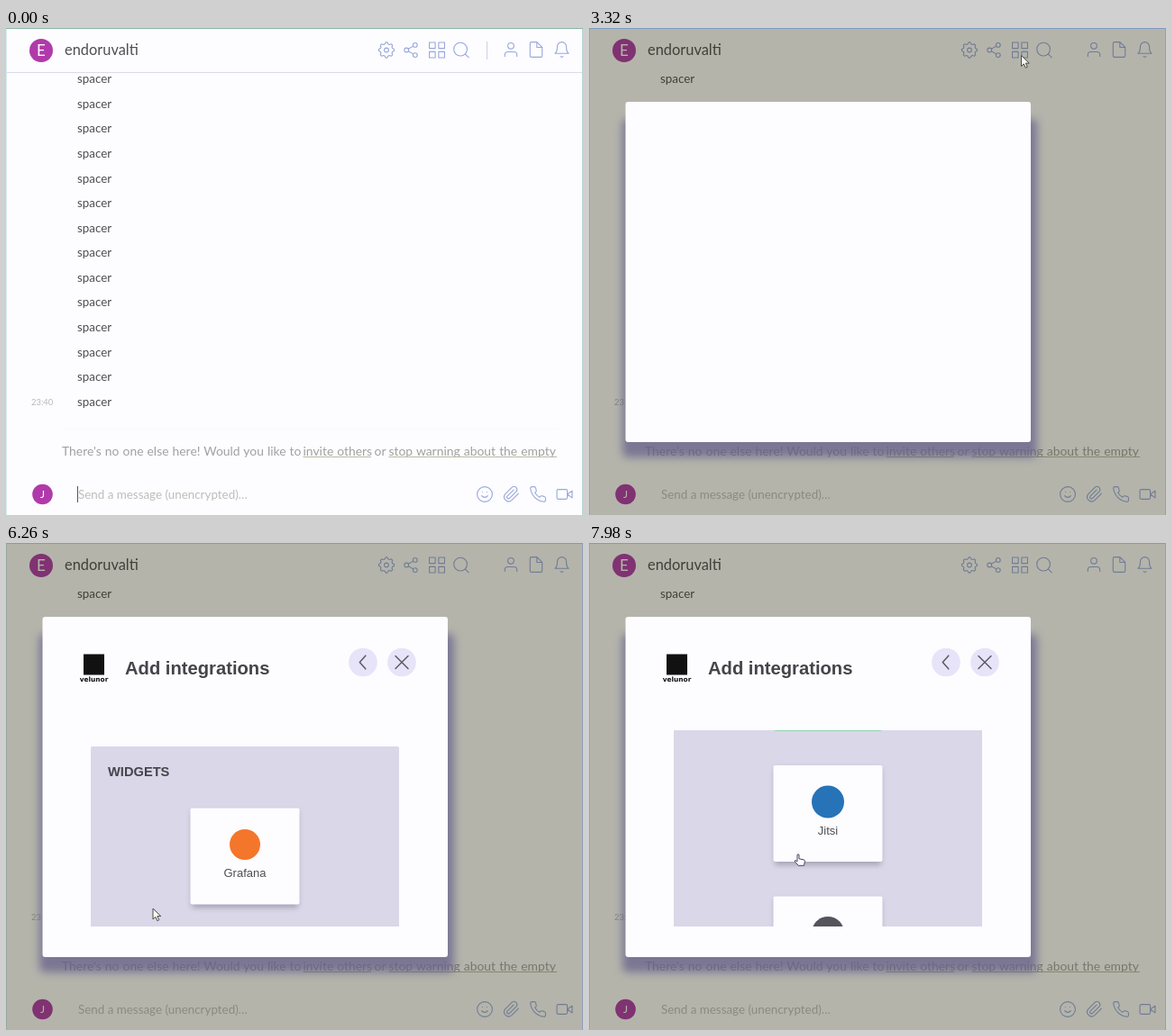
An HTML page for the animation above (8000 ms loop, 640 by 541 pixels).

```html
<!DOCTYPE html>
<html lang="en">
<head>
<meta charset="utf-8">
<title>Chat integrations</title>
<style>
  html, body { margin: 0; width: 100%; height: 100%; overflow: hidden; background: #fdfcff; }
  svg { display: block; width: 640px; height: 541px; }
  text { font-family: Lato, "Open Sans", sans-serif; font-size: 13.4px; fill: #4f4e53; white-space: pre; }
  .time { font-size: 9.4px; fill: #b8b7b9; }
  .notice { font-size: 13.9px; word-spacing: .5px; fill: #a1a0a1; }
  .dialog text { font-family: "Liberation Sans", Arial, sans-serif; font-size: 13px; }
  .dialog .title { font-size: 20.2px; font-weight: bold; fill: #45444a; }
  .dialog .section { font-size: 14.67px; font-weight: bold; fill: #45444a; }
  .dialog .brand { font: bold 7.4px "DejaVu Sans", sans-serif; fill: #111; }
</style>
</head>
<body>
<svg id="stage" viewBox="0 0 640 541" xmlns="http://www.w3.org/2000/svg"></svg>
<script>
const LOOP = 8000;
const ROW = 27.58;
const ICON = '#98a8da';
const INK = '#5c5c63';
const stage = document.getElementById('stage');

// ---- markup helpers ----
const rect = (x, y, w, h, fill, more = '') =>
  `<rect x="${x}" y="${y}" width="${w}" height="${h}" fill="${fill}" ${more}/>`;
const disc = (x, y, r, fill) => `<circle cx="${x}" cy="${y}" r="${r}" fill="${fill}"/>`;
const text = (x, y, value, more = '') => `<text x="${x}" y="${y}" ${more}>${value}</text>`;
const ring = (x, y, r) => `M${x - r} ${y}a${r} ${r} 0 1 0 ${2 * r} 0a${r} ${r} 0 1 0 ${-2 * r} 0`;
const icon = (x, y, scale, path, color = ICON, weight = 1.1) =>
  `<path transform="translate(${x} ${y}) scale(${scale}) translate(-12 -12)" d="${path}" fill="none"
    stroke="${color}" stroke-width="${weight / scale}" stroke-linecap="round" stroke-linejoin="round"/>`;
const avatar = (x, y, r, letter, size) => disc(x, y, r, '#b03aa9') +
  text(x, y + size * .36, letter, `text-anchor="middle" style="font-size:${size}px;fill:#fff"`);

function gearPath() {
  let d = '';
  for (let i = 0; i < 32; i++) {
    const angle = (i - 1.5) * Math.PI / 16;
    const radius = i % 4 === 1 || i % 4 === 2 ? 10.8 : 8.6;
    d += `${i ? 'L' : 'M'}${(12 + radius * Math.cos(angle)).toFixed(2)} ${(12 + radius * Math.sin(angle)).toFixed(2)}`;
  }
  return d + 'z' + ring(12, 12, 3);
}

const face = ring(12, 12, 10) + 'M8 14s1.5 2 4 2 4-2 4-2M9 9h.01M15 9h.01';
const paths = {
  gear: gearPath(),
  share: ring(18, 5, 3) + ring(6, 12, 3) + ring(18, 19, 3) + 'M8.6 13.5l6.8 4M15.4 6.5l-6.8 4',
  grid: 'M3 3h7v7H3zM14 3h7v7h-7zM14 14h7v7h-7zM3 14h7v7H3z',
  search: ring(11, 11, 8) + 'M21 21l-4.3-4.3',
  user: 'M20 21v-2a4 4 0 0 0-4-4H8a4 4 0 0 0-4 4v2' + ring(12, 7, 4),
  file: 'M13 2H6a2 2 0 0 0-2 2v16a2 2 0 0 0 2 2h12a2 2 0 0 0 2-2V9zM13 2v7h7',
  bell: 'M18 8A6 6 0 0 0 6 8c0 7-3 9-3 9h18s-3-2-3-9M13.7 21a2 2 0 0 1-3.4 0',
  clip: 'M21.4 11l-9.2 9.2a6 6 0 0 1-8.4-8.4L13 2.6a4 4 0 0 1 5.6 5.6l-9.2 9.2a2 2 0 0 1-2.8-2.8l8.5-8.5',
  phone: 'M22 16.9v3a2 2 0 0 1-2.2 2 19.8 19.8 0 0 1-8.6-3 19.5 19.5 0 0 1-6-6 19.8 19.8 0 0 1-3.1-8.7A2 2 0 0 1 4.1 2h3a2 2 0 0 1 2 1.7 12.8 12.8 0 0 0 .7 2.8 2 2 0 0 1-.4 2.1L8.1 9.9a16 16 0 0 0 6 6l1.3-1.3a2 2 0 0 1 2.1-.4 12.8 12.8 0 0 0 2.8.7A2 2 0 0 1 22 16.9z',
  video: 'M23 7l-7 5 7 5zM3 5h11a2 2 0 0 1 2 2v10a2 2 0 0 1-2 2H3a2 2 0 0 1-2-2V7a2 2 0 0 1 2-2z',
  react: face + 'M19 17.5h6M22 14.5v6',
  reply: 'M9 14L4 9.5 9 5M4 9.5h12a5 5 0 0 1 5 5V17',
  edit: 'M13 20h9M16.5 3.5a2.1 2.1 0 0 1 3 3L7 19l-4 1 1-4z',
  cross: 'M5 5l14 14M19 5L5 19',
  back: 'M15 4l-7 8 7 8'
};

// ---- chat window ----
function chat() {
  let rows = '';
  for (let i = 0; i < 14; i++) rows += text(79, 61.2 + i * ROW, 'spacer');
  const tools =
    icon(423, 148, .74, paths.react, INK) + icon(449, 148, .64, paths.reply, INK) +
    icon(475, 148, .66, paths.edit, '#85848c') +
    [142.5, 148, 153.5].map(y => disc(501, y, 1.5, '#3a3a4c')).join('');
  const notice = (x, value) => text(x, 475, value, 'class="notice"');
  const underline = (x1, x2) => rect(x1, 476, x2 - x1, 1, '#b9bba2');
  return rect(0, 0, 640, 541, '#fdfcff') +
    `<g clip-path="url(#messages)">
      <g id="hover">${rect(20, 154, 505, 27, '#f0fdff')}${text(28, 170, '23:40', 'class="time"')}${tools}</g>
      ${rows}</g>` +
    text(28, 418.5, '23:40', 'class="time"') +
    avatar(39, 25, 13, 'E', 17) +
    text(65, 30, 'endoruvalti', 'style="font-size:16.4px"') +
    icon(422, 24.5, .8, paths.gear) + icon(449, 24.5, .8, paths.share) +
    icon(478, 24.5, .94, paths.grid) + icon(505, 24.5, .92, paths.search) +
    icon(560, 24, .84, paths.user) + icon(588, 24, .84, paths.file) + icon(616.5, 24, .84, paths.bell) +
    `<g id="rules">${rect(0, 49, 640, 1, '#dcdbea')}${rect(533, 15, 1, 20, '#ccd2e6')}
      ${rect(62, 445, 549, 1, '#fcfbf5')}</g>` +
    notice(62, "There's no one else here! Would you like to") +
    notice(329.5, 'invite others') + underline(329.5, 405) +
    notice(408.5, 'or') +
    notice(424.5, 'stop warning about the empty') + underline(424.5, 611) +
    avatar(40.5, 518, 11.3, 'J', 12) +
    text(80, 523, 'Send a message (unencrypted)…', 'style="fill:#bebdb9"') +
    rect(79, 509, 1, 18, '#55555c', 'id="caret"') +
    icon(531, 518, .84, face) + icon(560.5, 518, .84, paths.clip) +
    icon(590, 518, .84, paths.phone) + icon(619.5, 518, .77, paths.video) +
    rect(634.5, 400, 5.5, 46, '#b7bddf', 'rx="2" id="scrollbar"') +
    rect(0, 0, 640, 1, '#8bb5a6') + rect(0, 1, 1, 540, '#d2ecee') + rect(639, 1, 1, 540, '#b4d2c8');
}

// ---- integrations dialog ----
const card = (y, color, label, r = 17, id = '') =>
  rect(206, y + 4, 118, 107, '#77758a', `rx="2" opacity=".55" filter="url(#soft)" id="${id}Shadow"`) +
  rect(204.5, y + .5, 121, 107, '#fdfcff', `rx="2" id="${id}"`) +
  disc(265, y + 41, r, color) +
  text(265, y + 77, label, 'text-anchor="middle"');

const panel = (label, cards) =>
  rect(94, 226, 342, 600, '#d9d7e8', 'rx="2"') + text(113, 259, label, 'class="section"') + cards;

const heading = label =>
  rect(86, 123.5, 23, 23, '#111') +
  text(97.5, 153.5, 'velunor', 'class="brand" text-anchor="middle"') +
  text(132, 146, label, 'class="title"') +
  disc(439, 132.5, 15.8, '#e7e3f8') + icon(439, 132.5, 1, paths.cross, INK, 1.5);

function dialog() {
  return `<g id="dialog" class="dialog">
    ${rect(0, 0, 640, 541, '#202400', 'opacity=".33"')}
    ${rect(0, 0, 640, 1, '#7f9ac0')}${rect(639, 0, 1, 541, '#8fa0bd')}
    ${rect(37, 101, 460, 376, '#68628c', 'rx="6" opacity=".75" filter="url(#deep)"')}
    ${rect(40.5, 82, 449.5, 378, '#fdfcff', 'rx="3"')}
    <g id="manage">${heading('Manage integrations')}
      <g clip-path="url(#shortList)">
        ${panel('EXISTING INTEGRATIONS', card(294, '#b9bdcb', 'Decalbasket', 17, 'firstCard'))}</g>
      ${rect(75, 393, 131.5, 33, '#454452', 'rx="16.5"')}
      ${text(140.5, 414, 'Add integrations', 'id="addLabel" text-anchor="middle"')}
    </g>
    <g id="add">${heading('Add integrations')}
      ${disc(396, 132.5, 15.8, '#e7e3f8')}${icon(396, 132.5, .92, paths.back, INK, 1.5)}
      <g clip-path="url(#longList)"><g id="list">
        ${panel('WIDGETS', card(294, '#f4762b', 'Grafana', 17, 'widgetCard') +
          card(439.5, '#2673b8', 'Jitsi', 18, 'callCard') + card(585, '#55535c', '', 18, 'lastCard'))}
      </g></g>
    </g>
  </g>`;
}

const cursors = `
  <path id="arrow" d="M0 0v12l2.8-2.6 2 4.3 2-1-2-4.1h4z" fill="#fbfbe8" stroke="#4a4a55" stroke-linejoin="round"/>
  <path id="hand" d="M-1 1q0-1.3 1-1.3T1 1v3.8l5 1q1.6.4 1.4 2L6.5 12.3H.2L-3.6 8q-.6-1.3.6-1.5L-1 7.8z"
    fill="#fdfcff" stroke="#454560" stroke-linejoin="round"/>`;

const clip = (id, x, y, w, h) => `<clipPath id="${id}">${rect(x, y, w, h, '#000')}</clipPath>`;
const blur = (id, size) => `<filter id="${id}" x="-20%" y="-20%" width="140%" height="140%">
  <feGaussianBlur stdDeviation="${size}"/></filter>`;

stage.innerHTML = `<defs>${clip('messages', 0, 50, 640, 400)}${clip('shortList', 94, 208, 342, 168)}
  ${clip('longList', 94, 208, 342, 218)}${blur('soft', 3)}${blur('deep', 5)}</defs>` +
  chat() + dialog() + cursors;

// ---- timeline ----
const parts = {};
stage.querySelectorAll('[id]').forEach(node => { parts[node.id] = node; });

const pointerPath = [
  [1060, 588, 538], [1180, 553, 318], [1300, 518.5, 162], [1500, 505, 104], [1700, 496, 62],
  [1860, 491, 41], [2400, 479.5, 30.5], [3700, 479.5, 30.5], [4100, 386.5, 164], [4500, 311, 274],
  [4760, 181, 342], [5260, 181, 342], [5540, 163, 406], [6720, 163, 406], [7240, 232, 346]
];
const scrollPath = [[7360, 0], [7520, 56], [7780, 142], [7980, 193]];

function along(points, t) {
  if (t <= points[0][0]) return points[0].slice(1);
  const next = points.findIndex(p => p[0] > t);
  if (next < 0) return points[points.length - 1].slice(1);
  const a = points[next - 1], b = points[next];
  const k = (t - a[0]) / (b[0] - a[0]);
  return a.slice(1).map((v, i) => v + (b[i + 1] - v) * k);
}

const show = (node, on) => { node.style.display = on ? '' : 'none'; };
const within = (x, y, l, t, r, b) => x >= l && x <= r && y >= t && y <= b;

// A hovered card swaps its shadow for a green outline.
function light(id, on) {
  parts[id].setAttribute('stroke', on ? '#8fd3ac' : 'none');
  show(parts[id + 'Shadow'], !on);
}

function render(t) {
  const [x, y] = along(pointerPath, t);
  const [scroll] = along(scrollPath, t);
  const pointer = t >= 1060;
  const open = t >= 2820;
  const managing = t >= 3340 && t < 5980;
  const adding = t >= 6200;

  show(parts.caret, t < 760 || (t >= 1360 && t < 1960));
  const inMessages = pointer && !open && within(x, y, 0, 50, 640, 500);
  show(parts.scrollbar, inMessages);
  show(parts.hover, inMessages && y < 430);
  parts.hover.setAttribute('transform', `translate(0 ${(Math.floor((y - 43.4) / ROW) - 4) * ROW})`);

  show(parts.rules, !open);
  show(parts.dialog, open);
  parts.dialog.setAttribute('opacity', Math.min(1, .35 + (t - 2820) / 120));
  show(parts.manage, managing);
  show(parts.add, adding);
  parts.list.setAttribute('transform', `translate(0 ${-scroll})`);

  // The card stays lit while scrolling, until the pointer moves again.
  const onCard = within(x, y, 204, 294, 326, 402);
  const onButton = managing && within(x, y, 75, 393, 206, 426);
  light('firstCard', managing && onCard);
  light('widgetCard', adding && onCard);
  parts.addLabel.style.fill = onButton ? '#7fd3a2' : '#fdfcff';

  const hand = (onCard && (managing || adding)) || (onButton && t < 5840);
  show(parts.arrow, pointer && !hand);
  show(parts.hand, pointer && hand);
  for (const node of [parts.arrow, parts.hand]) node.setAttribute('transform', `translate(${x} ${y})`);
}

const start = performance.now();
function tick() {
  render((performance.now() - start) % LOOP);
  requestAnimationFrame(tick);
}
tick();
</script>
</body>
</html>
```
